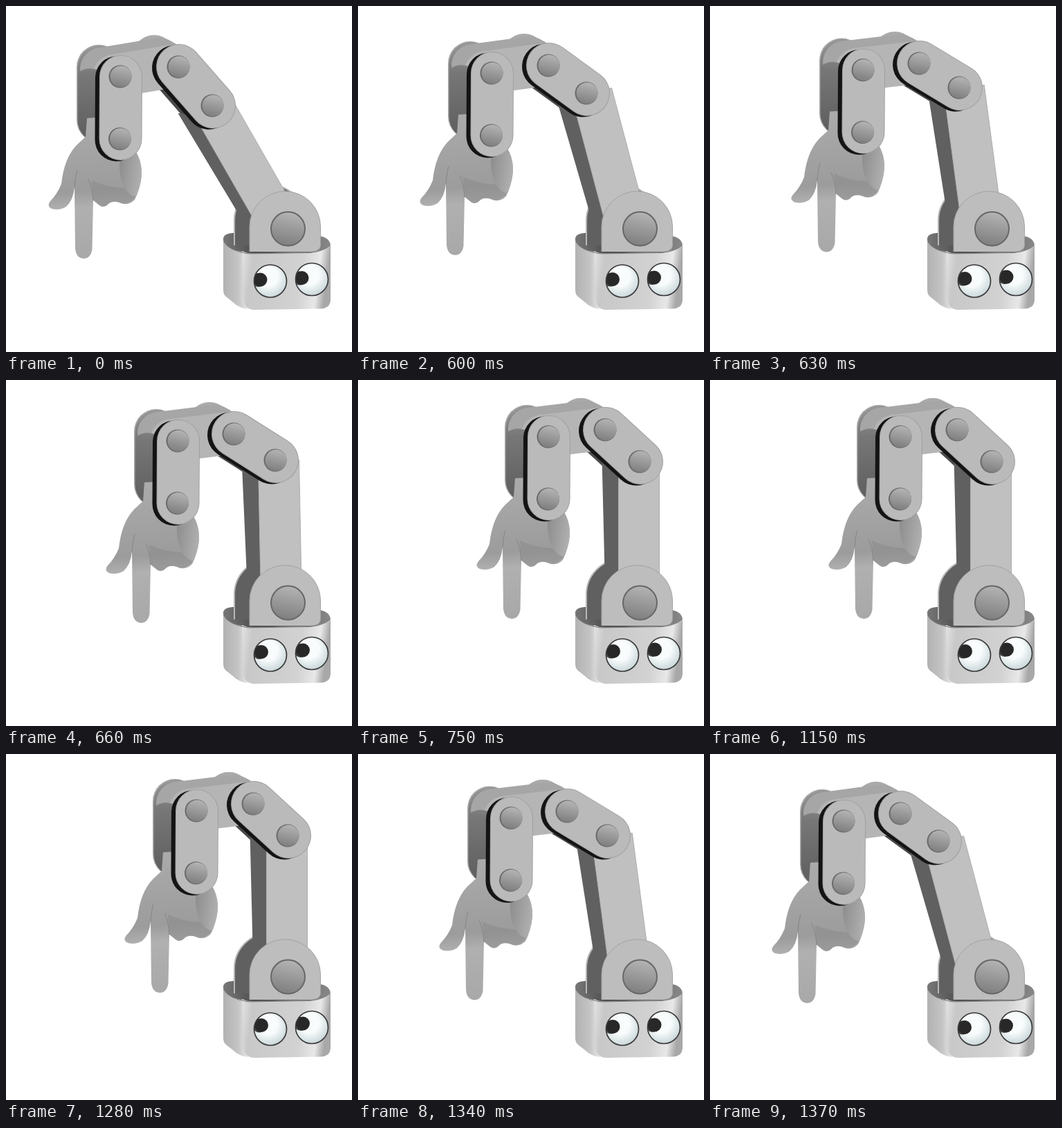
An HTML page for the animation above (1.4 s loop, 500 px wide and 500 px high).

```html
<!DOCTYPE html>
<html lang="en">
<head>
<meta charset="utf-8">
<title>Robot arm</title>
<style>
html, body { margin: 0; width: 100%; height: 100%; overflow: hidden; background: #fff; }
svg { display: block; width: 100vw; height: 100vh; }
</style>
</head>
<body>
<svg viewBox="0 0 500 500">
  <defs>
    <linearGradient id="bolt" x1=".6" y1="0" x2=".4" y2="1">
      <stop offset="0" stop-color="#b4b4b4"/><stop offset="1" stop-color="#7e7e7e"/>
    </linearGradient>
    <linearGradient id="block" gradientUnits="userSpaceOnUse" x1="0" y1="58" x2="0" y2="200">
      <stop offset="0" stop-color="#989898"/><stop offset=".3" stop-color="#777"/><stop offset="1" stop-color="#5c5c5c"/>
    </linearGradient>
    <linearGradient id="skin" gradientUnits="userSpaceOnUse" x1="110" y1="170" x2="125" y2="365">
      <stop offset="0" stop-color="#aaa"/><stop offset=".5" stop-color="#9c9c9c"/>
      <stop offset=".62" stop-color="#b0b0b0"/><stop offset="1" stop-color="#a8a8a8"/>
    </linearGradient>
    <linearGradient id="fist" x1="0" y1="0" x2="1" y2=".3">
      <stop offset="0" stop-color="#8b8b8b"/><stop offset="1" stop-color="#aeaeae"/>
    </linearGradient>
    <linearGradient id="front" x1="0" y1="0" x2="1" y2=".1">
      <stop offset="0" stop-color="#e6e6e6"/><stop offset=".14" stop-color="#c8c8c8"/>
      <stop offset=".7" stop-color="#d2d2d2"/><stop offset=".9" stop-color="#e8e8e8"/>
      <stop offset="1" stop-color="#a8a8a8"/>
    </linearGradient>
    <linearGradient id="left">
      <stop offset="0" stop-color="#b2b2b2"/><stop offset=".6" stop-color="#c4c4c4"/><stop offset="1" stop-color="#e6e6e6"/>
    </linearGradient>
    <linearGradient id="top">
      <stop offset="0" stop-color="#777"/><stop offset=".3" stop-color="#4d4d4d"/><stop offset="1" stop-color="#888"/>
    </linearGradient>
    <radialGradient id="white" cx=".42" cy=".36" r=".66">
      <stop offset=".45" stop-color="#f9fcfc"/><stop offset="1" stop-color="#c8d6d9"/>
    </radialGradient>
    <clipPath id="eyeClip"><circle r="23.500"/></clipPath>
    <path id="lug" d="M352 355V319A51 51 0 0 1 454.500 319V346Q454 355 440 355"/>
  </defs>

  <!-- rear of the base -->
  <path d="M314 347V335Q315 329 328 328L452 332Q469 335 469 347L450 358H345Z" fill="url(#top)"/>
  <use href="#lug" x="-22" y="-9" fill="#606060" stroke="#b8b8b8" stroke-width="2"/>

  <g id="arm"></g>

  <!-- front of the base -->
  <use href="#lug" fill="#bdbdbd" stroke="#a2a2a2"/>
  <circle cx="407.500" cy="322" r="24.500" fill="url(#bolt)" stroke="#676767" stroke-width="2"/>
  <path d="M314 338Q317 352 346 356L349 438Q336 436 328 428L318 420Q314 417 314 410Z" fill="url(#left)"/>
  <path d="M341 354Q349 358 358 357.500L440 356Q460 354 469 345V424Q469 437 454 437.500L358 439Q343 438 343 420Z" fill="url(#front)"/>
  <path d="M314.500 340Q322 354 350 358L440 356.500Q460 354 468 346" fill="none" stroke="#777"/>
  <g id="eyes"></g>
</svg>
<script>
const arm = document.getElementById('arm');
const eyes = document.getElementById('eyes');
const STEP = 30, LOOP = 1400;

// top and foot are the x positions of the two ends of the lower arm
const poses = [
  { wrist: [166, 102], elbow: [250, 88], shoulder: [299, 144], top: 298, foot: 400, look: [-14.500, -2] },
  { wrist: [194, 97], elbow: [276, 86], shoulder: [331, 126], top: 338, foot: 390, look: [-14, -2.500] },
  { wrist: [222, 92.500], elbow: [303, 83], shoulder: [361, 118], top: 367, foot: 394, look: [-13.500, -3.500] },
  { wrist: [249, 88], elbow: [330, 78], shoulder: [390, 116], top: 394, foot: 398, look: [-13, -4.500] },
  { wrist: [276, 82], elbow: [358, 72], shoulder: [408, 118], top: 406, foot: 406, look: [-13, -5.500] }
];

const add = (p, x, y) => [p[0] + x, p[1] + y];

const rod = (a, b, w, color) =>
  `<path d="M${a}L${b}" stroke="${color}" stroke-width="${w}" stroke-linecap="round"/>`;

const shift = (a, b, x, y, w, color) => rod(add(a, x, y), add(b, x, y), w, color);

const bolt = p =>
  `<circle cx="${p[0] - 1}" cy="${p[1]}" r="16.500" fill="#696969"/>
   <circle cx="${p[0]}" cy="${p[1]}" r="15.500" fill="url(#bolt)"/>`;

const plate = (a, b, r) =>
  shift(a, b, -6, 1.5, 2 * r, '#141414') + rod(a, b, 2 * r, '#a0a0a0') +
  rod(a, b, 2 * r - 2, '#bababa') + bolt(a) + bolt(b);

function beam(p, q) {
  const dx = q[0] - p[0], dy = q[1] - p[1], len = Math.hypot(dx, dy);
  const nx = 29.500 * dy / len, ny = -29.500 * dx / len;
  const l1 = add(p, -nx, -ny), l2 = add(q, -nx, -ny);
  return `<path d="M${l1}L${l2}L${add(l2, -19, -4)}L${add(l1, -24, -4)}Z" fill="#606060"/>
    <path d="M${l1}L${add(p, nx, ny)}L${add(q, nx, ny)}L${l2}Z" fill="#c0c0c0" stroke="#adadad"/>`;
}

function bar(a, b) {
  let s = '';
  for (let i = 0; i <= 6; i++) {
    s += shift(a, b, -28 + 3 * i, -11 + 1.7 * i, 62, i < 6 ? '#a6a6a6' : '#b5b5b5');
  }
  return s;
}

const hand = `
  <path fill="url(#skin)" d="M117 162L134 161L180 205Q196 218 196 242Q194 265 186 280Q176 290 164 284
    Q155 281 149 285Q142 293 135 288L126 281L124.500 352Q122 365 112 365Q101 364 100 350L99 262
    Q97 281 87 290Q77 296 66 293Q58 289 64 282Q74 272 80 257Q84 220 102 201L115 189Z"/>
  <path fill="url(#fist)" d="M164 222Q163 248 171 262Q178 274 188 274Q197 255 196 238Q195 222 188 211Z"/>
  <path fill="#8b8b8b" opacity=".55" d="M124 252Q145 262 171 263Q179 274 187 276Q176 290 164 284
    Q155 281 149 285Q142 293 135 288L126 280Z"/>
  <path stroke="#858585" d="M99 262Q100 246 103 237M126 281Q125 262 119 250"/>`;

function drawArm({ wrist, elbow, shoulder, top, foot }) {
  const knuckle = add(wrist, -0.5, 90);
  const move = `translate(${wrist[0] - 166} ${wrist[1] - 102})`;
  const cap = add(elbow, -36, -14);
  arm.innerHTML = `<g fill="none">
    ${rod(cap, cap, 64, '#aaa')}
    ${shift(elbow, shoulder, -14, -1, 66, '#4a4a4a')}
    ${beam([top, shoulder[1]], [foot, 322])}
    <g transform="${move}">
      ${rod([134, 88], [134, 165], 64, '#aaa')}
      ${rod([135.500, 89], [135.500, 165], 64, 'url(#block)')}
    </g>
    ${bar(wrist, elbow)}
    <g transform="${move}">
      <path d="M104 97Q116 86 134 93V194Q108 188 104 168Z" fill="url(#block)"/>
      ${hand}
    </g>
    ${plate(elbow, shoulder, 33)}${plate(wrist, knuckle, 31)}</g>`;
}

function eye(x, y, [px, py], shut) {
  const inside = shut
    ? `<circle r="24.500" fill="#2c2c2c"/>
       <path d="M-24 4Q2 11 25 1" fill="none" stroke="#858585" stroke-width="2.500"/>`
    : `<circle r="23.500" fill="url(#white)"/>
       <g clip-path="url(#eyeClip)"><circle cx="${px - 3}" cy="${py + 0.5}" r="10" fill="#444"/>
       <circle cx="${px}" cy="${py}" r="10" fill="#282828"/></g>
       <circle r="23.500" fill="none" stroke="#3a3a3a" stroke-width="1.700"/>`;
  return `<g transform="translate(${x} ${y})">${inside}</g>`;
}

function poseAt(t) {
  if (t < 600) return 0;
  if (t < 1280) return Math.min(4, 1 + Math.floor((t - 600) / STEP));
  return 4 - Math.floor((t - 1280) / STEP);
}

let last = '';
function render(now) {
  const t = now % LOOP;
  const k = Math.max(0, poseAt(t));
  const shut = t >= 1050 && t < 1150;
  const key = k + ' ' + shut;
  if (key !== last) {
    last = key;
    drawArm(poses[k]);
    eyes.innerHTML = eye(382, 397.500, poses[k].look, shut) + eye(442, 395, poses[k].look, shut);
  }
}

const start = performance.now();
function tick() {
  render(performance.now() - start);
  requestAnimationFrame(tick);
}
tick();
</script>
</body>
</html>
```
